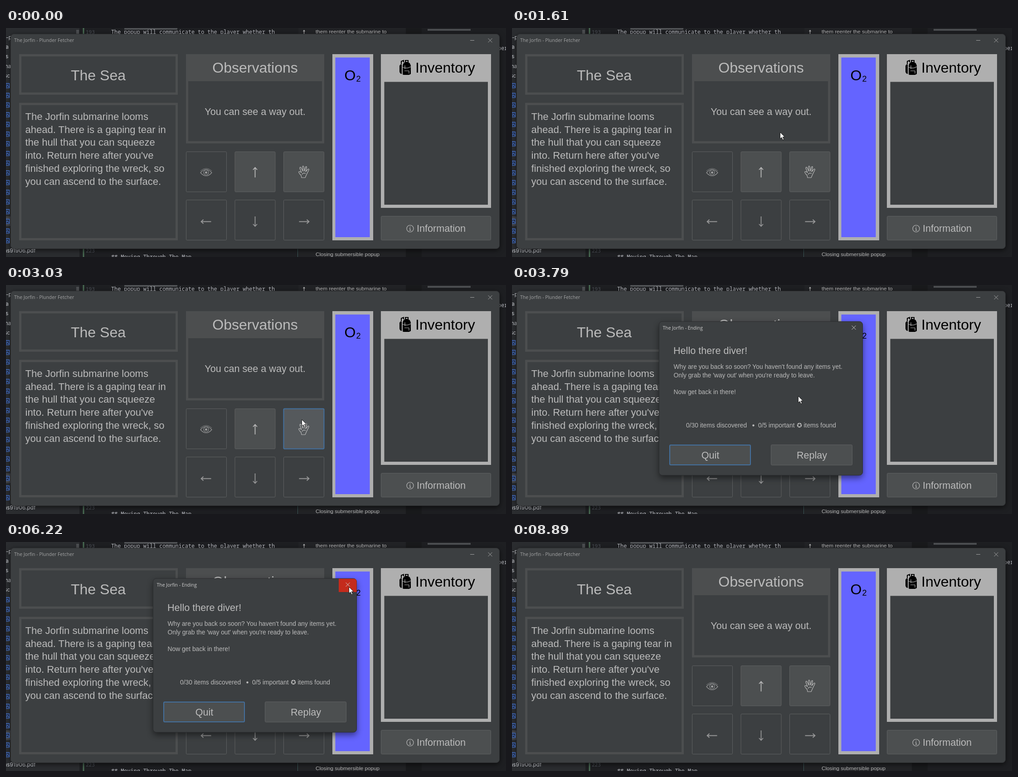
Write an HTML page that moves like this. It is 1103 by 508 pixels and loops after 8.95 s.

```html
<!DOCTYPE html>
<html lang="en">
<head>
<meta charset="utf-8">
<title>Submarine game</title>
<style>
html, body { margin: 0; width: 100%; height: 100%; overflow: hidden; background: #1e1f22; }
svg { display: block; }
text { font-family: "Liberation Sans", Arial, sans-serif; font-size: 21.6px; fill: #bbb; white-space: pre; }
.big { font-size: 32px; }
.small { font-size: 13.8px; }
.note { font-size: 11.7px; }
.bar { font: 10.4px "Open Sans", sans-serif; fill: #cfcfcf; }
.mono { font: 11.8px "Noto Sans Mono", monospace; fill: #bcbec4; }
.num { fill: #4e525a; font-size: 11px; }
.side { font: 12px Inter, sans-serif; fill: #ced0d6; }
.mid { text-anchor: middle; }
.black { fill: #000; }
.panel { fill: #3c3f41; }
.frame { fill: #3c3f41; stroke: #4c4e4f; stroke-width: 5; }
.light { fill: #afafaf; }
.btn { fill: #4c4f50; stroke: #5e6061; }
.off { fill: #3c3f41; }
.hover { fill: #55595c; stroke: #466d94; }
.focus { stroke: #43709f; stroke-width: 2; }
.line { fill: none; stroke: #bbb; stroke-width: 1.2; }
.arrow { stroke-width: 1.8; }
#story { font-size: 22px; }
#grey { opacity: .72; }
#popup { filter: drop-shadow(0 6px 7px #0007); }
</style>
</head>
<body>
<svg width="1103" height="508" viewBox="0 0 1103 508">
  <defs>
    <pattern id="files" width="10" height="21.5" y="117.500" patternUnits="userSpaceOnUse">
      <path d="M-3 5.500H7.500V15.500H-3M-1 14L3 9.500 7 13.500M1 8V9" fill="#25324d" stroke="#548af7"/>
    </pattern>
    <path id="left" class="line arrow" d="M11 0H-11M-6 -4.500L-11 0-6 4.500"/>
    <path id="cross" d="M-4.500-4.500L4.500 4.500M4.500-4.500L-4.500 4.500"/>
  </defs>

  <!-- editor behind the game -->
  <rect width="162" height="508" fill="#2b2d30"/>
  <rect x="645" width="237" height="508" fill="#222326"/>
  <rect x="882" width="35" height="508" fill="#191a1c"/>
  <path d="M155 4h6v10h-6zM261 0h117v4H261zM930 2h95v4h-95z" fill="#4d4f52"/>
  <path d="M171 0V14M171 489V508" stroke="#496b53" stroke-width="3"/>
  <path d="M643.500 489V508" stroke="#3f5c5c"/>
  <rect y="418" width="12" height="21" fill="#43454a"/>
  <rect y="117.500" width="10" height="365" fill="url(#files)"/>
  <text class="side" x="0" y="25" font-weight="bold">-p</text>
  <text class="side" x="-1" y="46">a</text>
  <text class="side" x="-1" y="67">s</text>
  <text class="side" x="-6" y="89">ma</text>
  <text class="side" x="-4" y="110">scr</text>
  <text class="side" x="-5" y="498">ns91906.pdf</text>
  <text class="mono num" x="176" y="13">193</text>
  <text class="mono" x="232" y="13">The popup will communicate to the player whether th</text>
  <text class="mono num" x="176" y="498">223</text>
  <text class="mono" x="232" y="512">## Moving Through The Map</text>
  <text class="mono" x="1078" y="49">.per</text>
  <path class="line" d="M657.500 13V5M655.500 7.500L657.500 5 659.500 7.500"/>
  <text class="note" x="683" y="12">them reenter the submarine to</text>
  <text class="note" x="683" y="506">Closing submersible popup</text>

  <g id="main">
    <rect class="panel" x="10.500" y="13.500" width="1078" height="476" rx="7" stroke="#303234"/>
    <g id="mainBar">
      <text class="bar" x="18" y="31">The Jorfin - Plunder Fetcher</text>
      <g stroke="#cfcfcf" fill="none"><path d="M1024 27.500H1033"/><use href="#cross" x="1068" y="27.500"/></g>
    </g>

    <rect class="frame" x="31.500" y="60.500" width="345" height="85"/>
    <text class="big mid" x="203.500" y="116">The Sea</text>
    <rect class="frame" x="31.500" y="168.500" width="345" height="300"/>
    <text id="story"></text>

    <rect x="397" y="58" width="305" height="198" fill="#4c4e4f"/>
    <rect class="panel" x="402" y="118" width="295" height="133"/>
    <text class="big mid" x="549.500" y="99">Observations</text>
    <text class="mid" x="549.500" y="193">You can see a way out.</text>

    <g id="pads"></g>
    <use href="#left" transform="translate(549.500 320.500) rotate(90)"/>
    <g id="grey">
      <g class="line">
        <path d="M429 321Q441.500 307 454 321Q441.500 335 429 321Z"/>
        <circle cx="441.500" cy="320.500" r="5.500"/>
        <circle cx="441.500" cy="320.500" r="2" fill="#bbb"/>
        <path d="M429 317Q441.500 306 454 317" stroke-width=".8"/>
      </g>
      <use href="#left" x="441.500" y="429.500"/>
      <use href="#left" transform="translate(549.500 429) rotate(-90)"/>
      <use href="#left" transform="translate(657.500 429.500) rotate(180)"/>
    </g>
    <path class="line" d="M652 332L651 327Q645 321 646 319Q648 317 652 321L648 311Q648 307 651 310L655 318 654 308Q655 304 657 308L658 318 661 308Q664 306 663 310L661 319 666 313Q669 312 668 315L663 325 660 332ZM653 325Q656 320 661 323"/>

    <rect class="light" x="720" y="58" width="90" height="413"/>
    <rect x="726.500" y="65.500" width="76" height="398.500" fill="#6464ff"/>
    <text class="big black" x="746.500" y="116">O</text>
    <text class="black" x="772.500" y="119" style="font-size:18px">2</text>

    <rect class="light" x="827" y="58" width="243" height="341"/>
    <rect class="panel" x="834.500" y="119.500" width="228.500" height="272.500"/>
    <path d="M868 84Q870 79 873 81V102Q868 101 868 96ZM875 84Q876 75 884 75Q892 76 893 84V102L889 104H877Q875 104 875 101Z"/>
    <path class="line" d="M872 80V74L877 72V76M881 76V72H887V76" style="stroke:#000;stroke-width:2"/>
    <path class="line" d="M875 87Q884 91 893 86M880 83V91M879 95H889M889 95V101" style="stroke:#afafaf"/>
    <text class="big black" x="903" y="99">Inventory</text>

    <rect id="info" class="btn" x="827.500" y="417.500" width="242" height="53" rx="2"/>
    <circle class="line" cx="891.500" cy="445" r="7.500"/>
    <path class="line" d="M891.500 440.500V442.500M889.500 444.500H891.500V449M889.500 449H894"/>
    <text x="906" y="452">Information</text>
  </g>

  <g id="popup">
    <rect class="panel" x="324.500" y="81" width="449" height="341" rx="7" stroke="#2b2d2f"/>
    <path id="close" d="M734 81.500H767Q773.500 81.500 773.500 88V111H734Z"/>
    <text class="bar" x="332.500" y="98.500">The Jorfin - Ending</text>
    <use href="#cross" x="754" y="94.500" stroke="#cfcfcf"/>
    <text x="356" y="153">Hello there diver!</text>
    <text class="small" x="356.500" y="186">Why are you back so soon? You haven't found any items yet.</text>
    <text class="small" x="356.500" y="205">Only grab the 'way out' when you're ready to leave.</text>
    <text class="small" x="356.500" y="242">Now get back in there!</text>
    <text class="small" x="384" y="316">0/30 items discovered</text>
    <circle cx="532.500" cy="311.500" r="2.200" fill="#bbb"/>
    <text class="small" x="543" y="316">0/5 important</text>
    <text class="small mid" x="634" y="316" style="font-family:'DejaVu Sans',sans-serif">✪</text>
    <text class="small" x="643.500" y="316">items found</text>
    <rect class="btn focus" x="348" y="355" width="178" height="44" rx="2"/>
    <text class="mid" x="437.500" y="385">Quit</text>
    <rect class="btn" x="571.500" y="354.500" width="179" height="45" rx="2"/>
    <text class="mid" x="661.500" y="385">Replay</text>
  </g>

  <path id="cursor" d="M-.5 -.5V14L2.900 10.900 5.300 16.500 7.700 15.500 5.300 10H9.800Z" fill="#fff" stroke="#000" stroke-width=".8"/>
</svg>
<script>
const $ = id => document.getElementById(id);
const LOOP = 8950;

const story = [
  'The Jorfin submarine looms', 'ahead. There is a gaping tear in', 'the hull that you can squeeze',
  "into. Return here after you've", 'finished exploring the wreck, so', 'you can ascend to the surface.'
];
$('story').innerHTML = story.map((s, i) => `<tspan x="42.5" y="${204 + i * 28.7}">${s}</tspan>`).join('');

for (let i = 0; i < 6; i++) {
  const x = 397.5 + i % 3 * 107.5, y = i < 3 ? 274.5 : 381.5;
  const kind = i === 1 || i === 2 ? 'btn' : 'btn off';
  $('pads').innerHTML += `<rect id="pad${i}" class="${kind}" x="${x}" y="${y}" width="89" height="89" rx="2"/>`;
}

// Pointer strokes: start, end, number of steps, then [step, x, y] points.
const strokes = [
  [470, 2370, 28, [[0, 930, 483], [1, 860, 450], [3, 755, 405], [5, 683, 384], [9, 640, 345], [13, 610, 312],
    [17, 586, 205], [19, 585, 180], [22, 640, 182], [25, 655, 260], [27, 652, 296], [28, 653, 299]]],
  [3790, 4760, 14, [[0, 632, 247], [4, 440, 110], [5, 390, 96], [8, 310, 185], [11, 430, 272], [13, 506, 281], [14, 508, 282]]],
  [5340, 6220, 13, [[0, 590, 265], [5, 690, 190], [10, 752, 106], [13, 757, 100]]],
  [7490, 8020, 8, [[0, 768, 115], [4, 860, 240], [6, 930, 395], [7, 972, 490], [8, 972, 508]]]
];

function pointer(t) {
  const stroke = strokes.findLast(s => t >= s[0]);
  if (!stroke || t >= 8020) return null;
  const [start, end, steps, points] = stroke;
  const n = Math.min(steps, Math.floor((t - start) / (end - start) * steps + 0.01));
  const k = points.findIndex(p => p[0] >= n);
  const b = points[k], a = points[k - 1] || b;
  const u = b === a ? 0 : (n - a[0]) / (b[0] - a[0]);
  return [a[1] + (b[1] - a[1]) * u, a[2] + (b[2] - a[2]) * u];
}

const inside = (p, x, y, w, h) => p && p[0] >= x && p[0] < x + w && p[1] >= y && p[1] < y + h;

function draw(t) {
  const p = pointer(t);
  const open = t >= 3230 && t < 6770;
  const focused = t >= 2840 && t < 2980 || t >= 6770 && t < 8890;

  $('cursor').style.display = p ? '' : 'none';
  if (p) $('cursor').setAttribute('transform', `translate(${p})`);

  $('mainBar').style.opacity = focused ? 1 : 0.7;
  $('main').style.filter = `drop-shadow(0 3px 6px ${focused ? '#000d' : '#0009'})`;

  const onHand = !open && inside(p, 612, 274, 90, 90);
  const handFocus = t >= 2840 && t < 8890;
  $('pad2').setAttribute('class', 'btn' + (onHand ? ' hover' : '') + (handFocus ? ' focus' : ''));
  $('info').setAttribute('class', 'btn' + (inside(p, 827, 417, 243, 54) ? ' hover' : ''));

  $('popup').style.display = open ? '' : 'none';
  $('popup').style.opacity = t < 3300 ? 0.7 : 1;
  const onClose = inside(p, 734, 81, 40, 30);
  $('close').setAttribute('fill', !onClose ? 'none' : t >= 6550 ? '#b22a1d' : '#c42b1c');
}

function tick(now) {
  draw(now % LOOP);
  requestAnimationFrame(tick);
}
draw(0);
requestAnimationFrame(tick);
</script>
</body>
</html>
```
